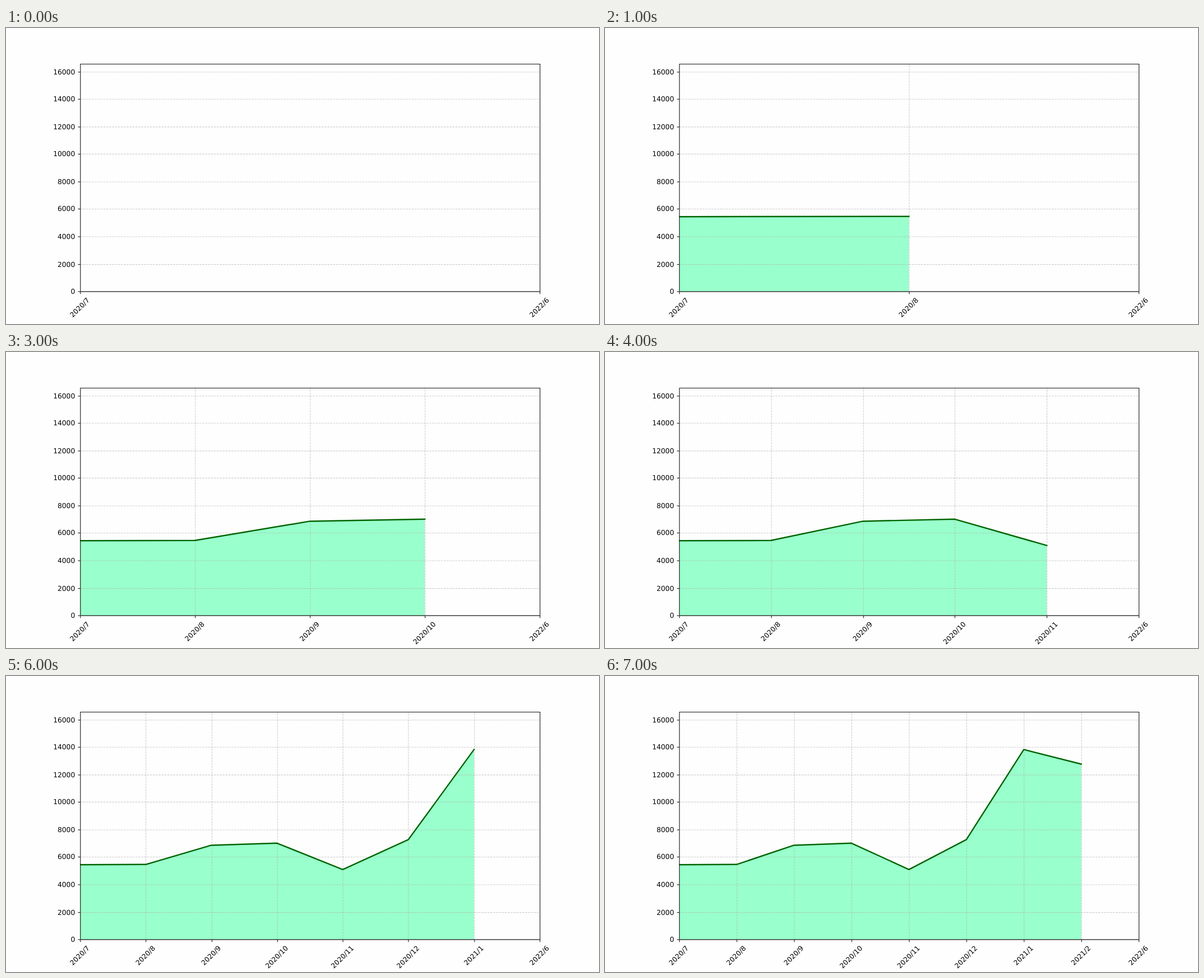
Recreate the animation shown at these times as an HTML page. Size 1058 px wide and 529 px high, loop 8000 ms.

```html
<!DOCTYPE html>
<html lang="en">
<head>
<meta charset="utf-8">
<title>Monthly values</title>
<style>
  html, body { margin: 0; width: 100%; height: 100%; overflow: hidden; background: #fefefe; }
  svg { display: block; width: 1058px; height: 529px; }
  text { font: 11.15px "DejaVu Sans", sans-serif; text-rendering: geometricPrecision; }
  .step { visibility: hidden; animation: show 8s step-end infinite; }
  @keyframes show {
    0% { visibility: visible; }
    12.5%, 100% { visibility: hidden; }
  }
  .area { fill: #99ffcc; }
  .grid { fill: none; stroke: #b0b0b0; stroke-opacity: .6; stroke-dasharray: 3.29 1.42; }
  .line { fill: none; stroke: #006400; stroke-width: 2.22; stroke-linecap: square; stroke-linejoin: round; }
  .axis { fill: none; stroke: #000; stroke-opacity: .92; }
  .ylab { text-anchor: end; }
  .xlab { text-anchor: middle; }
</style>
</head>
<body>
<svg id="chart" viewBox="0 0 960 480">
  <clipPath id="plot"><rect x="120" y="57.6" width="744" height="369.6"/></clipPath>
</svg>
<script>
const LEFT = 120, RIGHT = 864, TOP = 57.6, BASE = 427.2;
const values = [5439, 5455, 6855, 7002, 5089, 7266, 13818, 12754];
const Y_MAX = Math.max(...values) * 1.2;
const chart = document.getElementById('chart');

const snap = v => Math.round(v) + 0.5;
const yOf = v => BASE - (BASE - TOP) * v / Y_MAX;
const month = i => `${2020 + Math.floor((i + 6) / 12)}/${(i + 6) % 12 + 1}`;

function add(parent, tag, attrs, text) {
  const el = document.createElementNS('http://www.w3.org/2000/svg', tag);
  for (const key in attrs) el.setAttribute(key, attrs[key]);
  if (text) el.textContent = text;
  parent.appendChild(el);
  return el;
}

const yTicks = Array.from({ length: 9 }, (_, i) => i * 2000);
const rowGrid = yTicks.slice(1).map(v => `M${LEFT} ${snap(yOf(v))}H${RIGHT}`).join('');

function xLabel(parent, x, label) {
  const cy = label.length > 6 ? 456.3 : 453.8;
  add(parent, 'text', { class: 'xlab', y: 3, transform: `translate(${x} ${cy}) rotate(-45)` }, label);
}

// One state of the chart: months 0..last plus the fixed end label.
function drawStep(last) {
  const g = add(chart, 'g', { class: 'step', style: `animation-delay:${last - values.length}s` });
  const xOf = i => LEFT + (RIGHT - LEFT) * i / (last + 1);
  const points = values.slice(0, last + 1).map((v, i) => `${xOf(i)} ${yOf(v)}`).join('L');

  if (last) add(g, 'path', { class: 'area', d: `M${LEFT} ${BASE}L${points}V${BASE}Z` });
  let columns = '', ticks = '';
  for (let i = 0; i <= last + 1; i++) {
    const x = snap(xOf(i));
    if (i && i <= last) columns += `M${x} ${BASE}V${TOP}`;
    ticks += `M${x} 428V431.4`;
    xLabel(g, xOf(i), i > last ? '2022/6' : month(i));
  }
  add(g, 'path', { class: 'grid', d: rowGrid });
  add(g, 'path', { class: 'grid', d: columns });
  if (last) add(g, 'path', { class: 'line', d: `M${points}`, 'clip-path': 'url(#plot)' });
  add(g, 'path', { class: 'axis', d: ticks });
}

values.forEach((_, i) => drawStep(i));

add(chart, 'path', {
  class: 'axis',
  d: `M${snap(LEFT)} ${snap(TOP)}H${snap(RIGHT)}V${snap(BASE)}H${snap(LEFT)}Z`
});
for (const v of yTicks) {
  const y = yOf(v);
  add(chart, 'path', { class: 'axis', d: `M116.5 ${snap(y)}H120` });
  add(chart, 'text', { class: 'ylab', x: 111.8, y: Math.round(y + 4) }, String(v));
}
</script>
</body>
</html>
```
